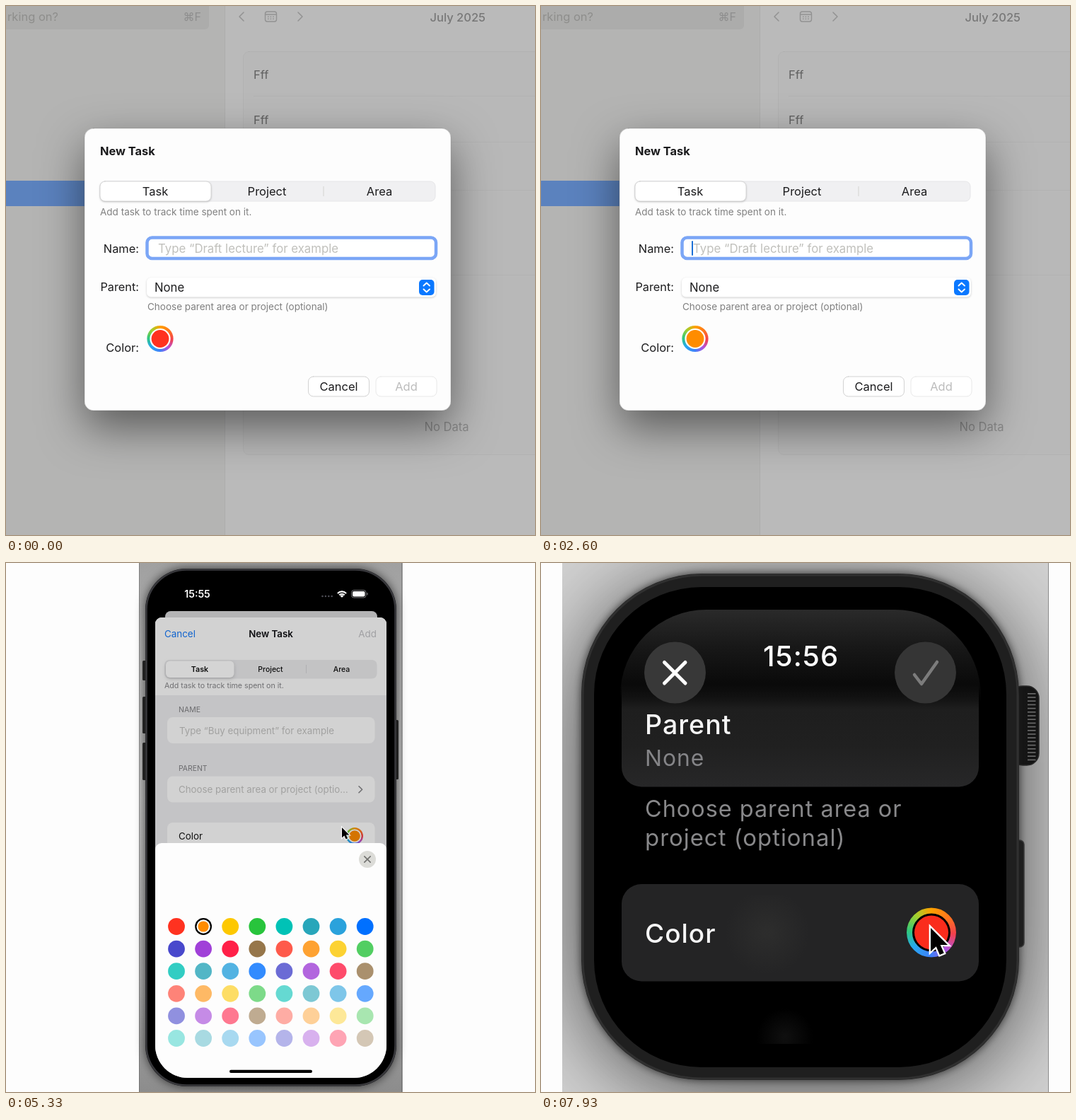
Animation of 748x748 px, one loop 8000 ms. Source, as an HTML page with a canvas:

```html
<!DOCTYPE html>
<html lang="en">
<head>
<meta charset="utf-8">
<title>New Task</title>
<style>
  html, body { margin: 0; width: 100%; height: 100%; overflow: hidden; background: #fdfdfd; }
  canvas { display: block; width: 100vw; height: 100vh; }
</style>
</head>
<body>
<canvas id="stage"></canvas>
<script>
const SIZE = 748, LOOP = 8000, PHONE_AT = 3070, WATCH_AT = 7400;
const canvas = document.getElementById('stage');
const dpr = window.devicePixelRatio || 1;
canvas.width = canvas.height = SIZE * dpr;
const c = canvas.getContext('2d');

// ---------- timing ----------
const ramp = (t, a, b) => Math.min(1, Math.max(0, (t - a) / (b - a)));
const ease = (t, a, b) => { const k = ramp(t, a, b); return k * k * (3 - 2 * k); };
const caretAlpha = t => { const p = t % 1000; return ramp(p, 340, 400) - ramp(p, 840, 900); };

// Position along timed stops [time, x, y]; null outside of them.
function along(t, stops) {
  if (t < stops[0][0] || t > stops[stops.length - 1][0]) return null;
  const i = Math.max(1, stops.findIndex(s => s[0] >= t));
  const [a, ax, ay] = stops[i - 1], [b, bx, by] = stops[i];
  const k = ease(t, a, b);
  return [ax + (bx - ax) * k, ay + (by - ay) * k];
}

// ---------- drawing helpers ----------
function box(x, y, w, h, r, fill, stroke, width = 1) {
  c.beginPath();
  c.roundRect(x, y, w, h, r);
  if (fill) { c.fillStyle = fill; c.fill(); }
  if (stroke) { c.strokeStyle = stroke; c.lineWidth = width; c.stroke(); }
}

function disc(x, y, r, fill) {
  c.beginPath();
  c.arc(x, y, r, 0, 7);
  c.fillStyle = fill;
  c.fill();
}

function ring(x, y, r, stroke, width) {
  c.beginPath();
  c.arc(x, y, r, 0, 7);
  c.strokeStyle = stroke;
  c.lineWidth = width;
  c.stroke();
}

function line(points, stroke, width) {
  c.beginPath();
  points.forEach(([x, y]) => c.lineTo(x, y));
  c.strokeStyle = stroke;
  c.lineWidth = width;
  c.lineCap = c.lineJoin = 'round';
  c.stroke();
}

// y is the middle of the capitals
function text(str, x, y, size, color, align = 'left', weight = 400) {
  c.font = `${weight} ${size}px Inter, "DejaVu Sans", sans-serif`;
  c.textAlign = align;
  c.fillStyle = color;
  c.fillText(str, x, y + size * 0.364);
}

function withStops(gradient, stops) {
  stops.forEach(([at, color]) => gradient.addColorStop(at, color));
  return gradient;
}
const linear = (x0, y0, x1, y1, ...stops) => withStops(c.createLinearGradient(x0, y0, x1, y1), stops);
const radial = (x, y, r0, r1, ...stops) => withStops(c.createRadialGradient(x, y, r0, x, y, r1), stops);

function shadowed(color, blur, dy, draw) {
  c.save();
  c.shadowColor = color;
  c.shadowBlur = blur * dpr;
  c.shadowOffsetY = dy * dpr;
  draw();
  c.restore();
}

function clipped(x, y, w, h, r, draw) {
  c.save();
  c.beginPath();
  c.roundRect(x, y, w, h, r);
  c.clip();
  draw();
  c.restore();
}

function cursor(pos, scale) {
  if (!pos) return;
  c.save();
  c.translate(...pos);
  c.scale(scale, scale);
  c.beginPath();
  [[0, 0], [0, 17], [4, 13.4], [6.6, 19.5], [9.6, 18.2], [7, 12.3], [12.3, 12.3]]
    .forEach(p => c.lineTo(...p));
  c.closePath();
  c.lineJoin = 'miter';
  c.lineWidth = 2.4;
  c.strokeStyle = '#fff';
  c.stroke();
  c.fillStyle = '#000';
  c.fill();
  c.restore();
}

function colorWell(x, y, r, width, gap, inner, color) {
  const rainbow = withStops(c.createConicGradient(-Math.PI / 2, x, y), [
    [0, '#ffa000'], [.14, '#ff7420'], [.26, '#f4404c'], [.38, '#b452dc'], [.5, '#3f80fa'],
    [.64, '#28a8f0'], [.76, '#30c87c'], [.88, '#a0d030'], [1, '#ffa000']]);
  disc(x, y, r, gap);
  ring(x, y, r - width / 2, rainbow, width);
  disc(x, y, inner, color);
}

// ---------- swatches ----------
const RED = '#ff3220', ORANGE = '#ff8c00';
const palette = (teal, cyan) => [RED, ORANGE, '#fdc800', '#28c43c', '#00c2b6', teal, cyan, '#0070ff',
  '#4848cc', '#a040d8', '#ff2048', '#96764a'];
const macPalette = palette('#4a9acb', '#48b2ff');
const phonePalette = palette('#28a6ba', '#2aa2dc');

// Twelve base colours, repeated in four strengths over eight columns.
function swatches(colors, x, y, dx, dy, r, selected, dark, alpha = 1) {
  for (let i = 0; i < 48; i++) {
    const cx = x + dx * (i % 8), cy = y + dy * Math.floor(i / 8);
    const chosen = i === selected;
    if (chosen) {
      disc(cx, cy, r, dark);
      disc(cx, cy, r * 0.81, '#fff');
    }
    c.globalAlpha = alpha * (1 - 0.2 * Math.floor(i / 12));
    disc(cx, cy, chosen ? r * 0.64 : r, colors[i % 12]);
    c.globalAlpha = alpha;
  }
}

// ---------- desktop ----------
function macWindow() {
  box(0, 0, 309, SIZE, 0, '#b4b4b3');
  box(309, 0, 439, SIZE, 0, '#bababa');
  box(309, 0, 1, SIZE, 0, '#adadad');
  box(-20, -10, 307, 43, 6, 'rgba(80,80,80,.08)');
  text('rking on?', 74, 15, 16.5, '#8e8e8c', 'right');
  text('⌘F', 276, 15, 16, '#8e8e8e', 'right');
  line([[336, 9], [330, 15], [336, 21]], '#929292', 1.5);
  line([[413, 9], [419, 15], [413, 21]], '#929292', 1.5);
  box(366.5, 8, 16, 14, 3, null, '#929292', 1.4);
  line([[367, 12], [382, 12]], '#929292', 1.4);
  for (let i = 0; i < 6; i++) box(370 + i % 3 * 3.6, 14.5 + (i > 2 ? 3 : 0), 1.6, 1.6, 0, '#929292');
  text('July 2025', 678, 15.5, 16.5, '#787878', 'right', 500);
  box(335.5, 64.5, 440, 570, 8, 'rgba(0,0,0,.012)', 'rgba(0,0,0,.035)');
  for (const y of [127, 192, 260, 380]) box(350, y, 398, 1, 0, 'rgba(0,0,0,.03)');
  text('Fff', 350, 97, 16.5, '#606060');
  text('Fff', 350, 161, 16.5, '#606060');
  text('No Data', 623, 595, 16.6, '#8a8a8a', 'center');
  box(0, 247, 200, 36, 0, '#5b82be');
}

function macDialog(t, color) {
  shadowed('rgba(0,0,0,.5)', 62, 24, () => box(111, 173, 518, 399, 13, '#fdfdfd'));
  box(111, 173, 518, 399, 13, '#fdfdfd', 'rgba(120,120,120,.45)', .8);
  text('New Task', 133, 205.5, 16.4, '#1a1a1c', 'left', 700);

  box(133, 248, 474, 28, 7, '#f0f0f2', '#e6e6e8');
  shadowed('rgba(0,0,0,.25)', 3, 1, () => box(133, 248, 157, 28, 7, '#fff'));
  box(133, 248, 157, 28, 7, null, '#d0d0d0', .8);
  box(448.5, 255, 1, 14, 0, '#d4d4d0');
  text('Task', 211, 262, 16.5, '#1c1c1e', 'center');
  text('Project', 369, 262, 16.5, '#1c1c1e', 'center');
  text('Area', 528, 262, 16.5, '#1c1c1e', 'center');
  text('Add task to track time spent on it.', 133, 291, 13.5, '#808080');

  text('Name:', 188, 343, 16.4, '#1c1c1e', 'right');
  box(199.5, 327.5, 408.5, 29.5, 7, '#fff', '#7ba6f6', 4.5);
  text('Type “Draft lecture” for example', 215, 343, 16.8, '#c0c0bc');
  c.globalAlpha = caretAlpha(t);
  box(213, 332, 2, 21, 1, '#1a6fd6');
  c.globalAlpha = 1;

  text('Parent:', 188, 397.5, 16.3, '#1c1c1e', 'right');
  shadowed('rgba(0,0,0,.2)', 3, 1, () => box(199, 384, 409, 27.5, 6, '#fff'));
  text('None', 210, 397.5, 16.7, '#1c1c1e');
  box(584, 387, 21.5, 22, 5, '#0a78ff');
  line([[590.5, 395.5], [594.7, 391.5], [599, 395.5]], '#fff', 1.9);
  line([[590.5, 400.5], [594.7, 404.5], [599, 400.5]], '#fff', 1.9);
  text('Choose parent area or project (optional)', 200, 425, 13.5, '#7f7f7f');

  text('Color:', 188, 483, 16.5, '#1c1c1e', 'right');
  colorWell(218, 470.5, 18.6, 4, '#fff', 12.4, color);

  for (const [x, label, ink, edge] of [[427.5, 'Cancel', '#1c1c1e', '#d2d2d2'], [523, 'Add', '#bcbcbc', '#e8e8e8']]) {
    box(x, 524, 86, 28, 7, '#fff', edge);
    text(label, x + 43, 538, 16.5, ink, 'center');
  }
}

function macPopover(alpha, selected) {
  if (!alpha) return;
  c.save();
  c.globalAlpha = alpha;
  shadowed('rgba(0,0,0,.4)', 26, 7, () => box(24.5, 102.5, 385.5, 332, 13, '#e5e5e7'));
  box(24.5, 102.5, 385.5, 332, 13, linear(24, 102, 200, 434, [0, '#dcdcd8'], [.3, '#e2e2e3'], [1, '#e6e6ea']), '#a4a4a2', .9);
  clipped(24.5, 102.5, 385.5, 332, 13, () =>
    box(24, 150, 160, 230, 0, radial(24, 265, 5, 110, [0, 'rgba(180,212,250,.9)'], [1, 'rgba(180,212,250,0)'])));
  c.beginPath();
  c.moveTo(199, 433.5);
  c.quadraticCurveTo(206, 435, 211, 442);
  c.quadraticCurveTo(218, 458, 225, 442);
  c.quadraticCurveTo(230, 435, 237, 433.5);
  c.fillStyle = '#e6e6e9';
  c.fill();
  swatches(macPalette, 64.3, 143, 43.75, 50.4, 18.5, selected, '#343230', alpha);
  c.restore();
}

function mac(t) {
  const picked = t >= 2000;
  macWindow();
  macDialog(t, picked ? ORANGE : RED);
  macPopover(ease(t, 880, 980) - ease(t, 2080, 2260), picked ? 1 : 0);
  cursor(along(t, [[420, 330, 600], [820, 214, 467], [1500, 214, 467], [1900, 107, 143], [2300, 107, 143]]), 1.15);
}

// ---------- phone ----------
function phoneBody() {
  box(0, 0, SIZE, SIZE, 0, '#fdfdfd');
  box(188, 0, 372.5, SIZE, 0, linear(0, 0, 0, SIZE, [0, '#a0a0a0'], [.12, '#acacac'], [.45, '#bebebe'], [.8, '#aaaaaa'], [1, '#8c8c8c']));
  box(188, 0, 1, SIZE, 0, 'rgba(60,60,60,.35)');
  box(559.5, 0, 1, SIZE, 0, 'rgba(55,55,55,.6)');
  for (const [x, y, h] of [[193, 138, 28], [193, 189, 52], [193, 254, 53], [550, 222, 84]])
    box(x, y, 5, h, 1.5, '#2c2c2c');
  shadowed('rgba(0,0,0,.65)', 14, 0, () => box(197, 8, 355, 732, 58, '#18181a'));
  box(198.5, 9.5, 352, 729, 57, '#000', '#38383c', 2.5);

  text('15:55', 270.5, 44, 14.2, '#fff', 'center', 600);
  for (let i = 0; i < 4; i++) disc(447.5 + i * 4.4, 47, 1.3, '#4c4c54');
  c.lineCap = 'butt';
  for (const r of [3, 6.3, 9.6]) {
    c.beginPath();
    c.arc(475, 49, r - 1, -2.36, -.78);
    c.strokeStyle = '#fff';
    c.lineWidth = r === 3 ? 3.6 : 2.1;
    c.stroke();
  }
  box(488.5, 38.5, 20.5, 10.5, 3.2, null, '#77777a', 1);
  box(490, 40, 17.5, 7.5, 2, '#fff');
  box(510.3, 42, 1.3, 3.5, 1, '#77777a');
}

function phoneForm(t, color) {
  box(225, 68, 300, 20, 8, '#d8d8da');
  box(211, 77, 327, 651, [9, 9, 46, 46], '#ececee');
  box(211, 77, 327, 110, [9, 9, 0, 0], '#fcfcfc');
  text('Cancel', 224, 100.5, 13.4, '#1478f8');
  text('New Task', 374.5, 100.5, 13.3, '#101014', 'center', 600);
  text('Add', 524, 100.5, 13.4, '#c0c0c4', 'right');

  box(224, 137, 300.5, 26.5, 7, '#eaeaec');
  shadowed('rgba(0,0,0,.18)', 5, 2, () => box(226, 138.5, 96.5, 23.5, 6, '#fff'));
  box(424, 144, 1, 12, 0, '#d3d3d6');
  text('Task', 274, 150, 10.7, '#111', 'center', 600);
  text('Project', 374, 150, 10.5, '#111', 'center', 500);
  text('Area', 474.5, 150, 10.5, '#111', 'center', 500);
  text('Add task to track time spent on it.', 224, 173, 10.65, '#858588');

  text('NAME', 244, 207, 10.5, '#808084');
  text('PARENT', 244, 290.5, 10.4, '#808084');
  for (const y of [218, 301.5, 367]) box(228, y, 293.5, 37, 8, '#fcfcfc');
  text('Type “Buy equipment” for example', 245, 237, 13.3, '#c2c2c0');
  text('Choose parent area or project (optio…', 244, 320.5, 13.3, '#c2c2c0');
  line([[499, 315.8], [503.6, 320.3], [499, 324.8]], '#858588', 1.6);
  c.globalAlpha = caretAlpha(t);
  box(244, 227.5, 1.8, 18, 1, '#1a72d8');
  c.globalAlpha = 1;
  text('Color', 244, 386, 13.35, '#141414');
  colorWell(493, 386, 12, 2.4, '#fff', 7.8, color);
}

function phonePicker(open, scroll, selected) {
  const top = 396 + 336 * (1 - open);
  clipped(211, 77, 327, 651, [9, 9, 46, 46], () => clipped(211, top, 327, 400, [9, 9, 0, 0], () => {
    box(211, top, 327, 400, 0, '#fdfdfd');
    swatches(phonePalette, 241, top + 118 - scroll, 38.1, 31.6, 11.9, selected, '#000');
    disc(511, top + 23, 12, 'rgba(205,205,200,.68)');
    line([[506.8, top + 18.8], [515.2, top + 27.2]], '#747472', 1.7);
    line([[515.2, top + 18.8], [506.8, top + 27.2]], '#747472', 1.7);
  }));
}

function phone(t) {
  const open = ease(t, 4760, 5130) - ease(t, 6900, 7200);
  const scroll = 150 * (ease(t, 6060, 6380) - ease(t, 6440, 6680));
  const picked = t >= 5700;
  phoneBody();
  phoneForm(t, picked ? RED : ORANGE);
  if (open) {
    const dim = `rgba(0,0,0,${0.17 * open})`;
    box(225, 68, 300, 9, [8, 8, 0, 0], dim);
    box(211, 77, 327, 651, [9, 9, 46, 46], dim);
    phonePicker(open, scroll, picked ? 0 : 1);
  }
  box(316, 716.8, 117, 4.2, 2.1, '#000');
  cursor(along(t, [[4250, 470, 560], [4650, 491, 384], [5130, 491, 384], [5280, 481, 378], [5330, 475, 374],
    [5640, 240, 512], [5740, 240, 512], [6040, 497, 650], [6380, 497, 513], [6520, 497, 513],
    [6800, 510, 418], [7050, 510, 418]]), 0.85);
}

// ---------- watch ----------
function watchBody() {
  box(0, 0, SIZE, SIZE, 0, '#fdfdfd');
  clipped(30, 0, 688, SIZE, 0, () => {
    box(30, 0, 688, SIZE, 0, '#d2d2d2');
    shadowed('rgba(0,0,0,.75)', 130, 12, () => box(62, 24, 609, 700, 168, '#222'));
  });
  box(717, 0, 1, SIZE, 0, '#8a8a8a');
  box(664, 174, 40, 112, 17, '#141414', '#2a2a2a', 1.5);
  for (let y = 184; y < 279; y += 5.2) box(688, y, 11.5, 1.6, 0, '#6c6c6c');
  box(668, 392, 15, 151, 6, '#1e1e1e', '#3c3c3c', 1.5);
  shadowed('rgba(30,30,30,.8)', 12, 0, () => box(57, 15, 619, 716, 171, '#222222'));
  box(59, 17, 615, 712, 169, '#1f1f1f', '#303030', 3);
  box(75, 34, 583, 679, 152, '#000');
}

function watch(t) {
  watchBody();
  clipped(112, 66, 510, 640, [122, 122, 110, 110], () => {
    box(112, 66, 510, 130, 0, linear(0, 66, 0, 196, [0, '#2a2a2a'], [.4, '#181818'], [.75, '#0c0c0c'], [1, '#000']));
    box(114, 170, 505, 146.5, [0, 0, 28, 28], linear(0, 170, 0, 316, [0, 'rgba(32,32,32,0)'], [.25, '#1e1e1e'], [.6, '#202020'], [1, '#272728']));
  });
  box(270, 630, 150, 50, 0, radial(345, 670, 2, 40, [0, '#0f0f0f'], [1, '#000']));
  disc(189.5, 155, 43.5, '#383838');
  disc(543.5, 155, 43.5, '#353535');
  line([[174.5, 140.5], [204, 170]], '#fff', 5);
  line([[204, 140.5], [174.5, 170]], '#fff', 5);
  line([[528, 158], [538, 171], [560, 140]], '#7c7c7c', 4.5);

  c.letterSpacing = '1px';
  text('15:56', 367.5, 131.5, 40, '#fff', 'center', 500);
  text('Parent', 147, 228, 37.6, '#f4f4f4', 'left', 500);
  text('None', 147, 275.5, 31.8, '#858588');
  text('Choose parent area or', 147, 347, 32.4, '#88888a');
  text('project (optional)', 147, 388, 32.9, '#88888a');

  box(114, 454, 505, 137.5, 28, '#242425');
  box(200, 470, 220, 110, 0, radial(320, 522, 5, 60, [0, 'rgba(70,70,66,.25)'], [1, 'rgba(70,70,66,0)']));
  text('Color', 147, 524, 37, '#f6f6f6', 'left', 500);
  c.letterSpacing = '0px';
  colorWell(552, 522.5, 35, 8, '#000', 24, '#fa2c1c');
  cursor(along(t, [[7500, 640, 640], [7850, 551, 516], [LOOP, 551, 516]]), 1.95);
}

// ---------- loop ----------
const start = performance.now();
function frame() {
  const t = (performance.now() - start) % LOOP;
  c.setTransform(dpr, 0, 0, dpr, 0, 0);
  c.clearRect(0, 0, SIZE, SIZE);
  if (t < PHONE_AT) mac(t);
  else if (t < WATCH_AT) phone(t);
  else watch(t);
  requestAnimationFrame(frame);
}
frame();
</script>
</body>
</html>
```
